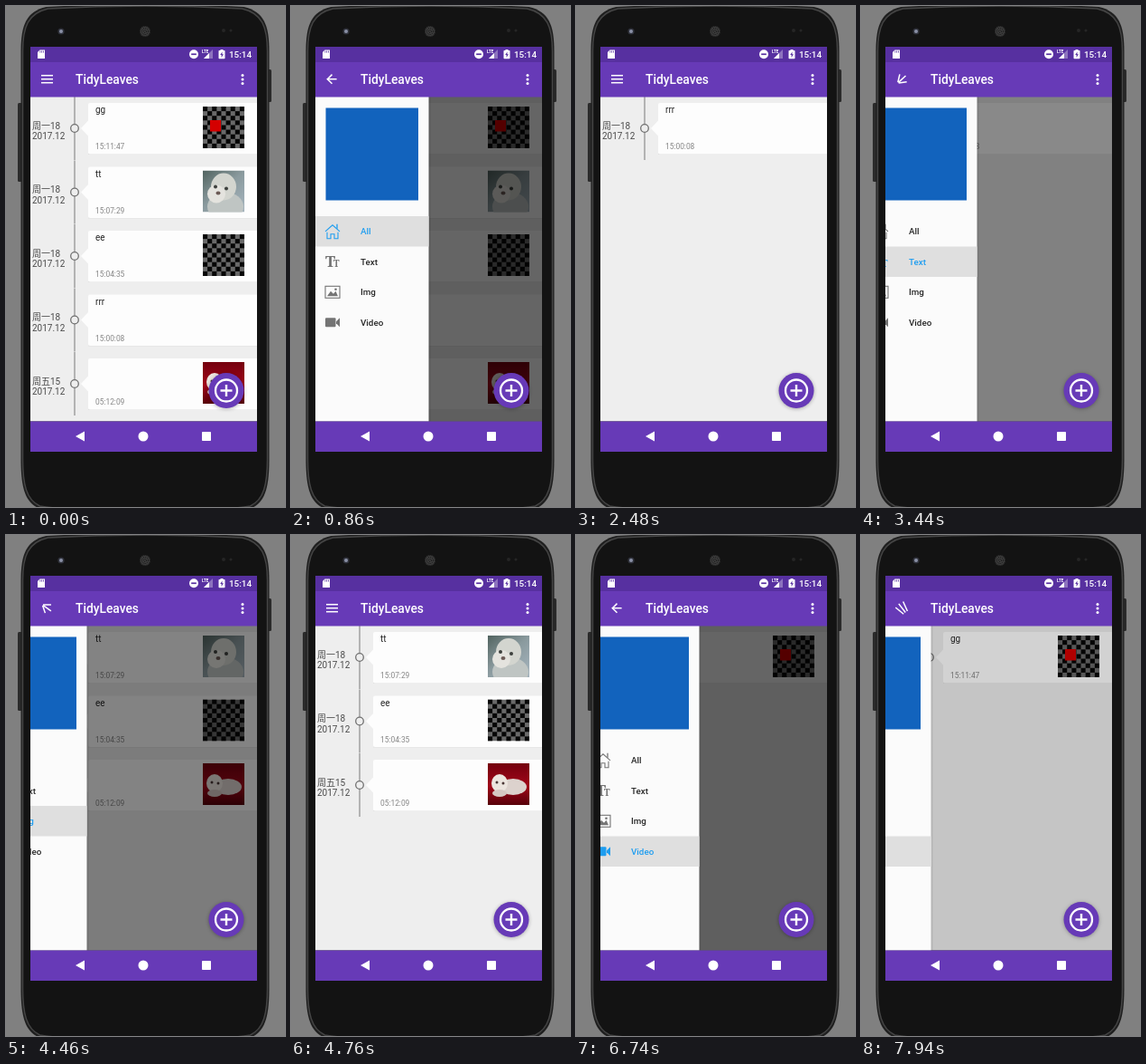
Recreate the animation shown at these times as an HTML page with a canvas. Size 309x553 px, loop 8000 ms.

```html
<!DOCTYPE html>
<html lang="en">
<head>
<meta charset="utf-8">
<title>Notes drawer</title>
<style>
html, body { margin: 0; width: 100%; height: 100%; overflow: hidden; background: #808080; }
canvas { display: block; width: 309px; height: 553px; }
</style>
</head>
<body>
<canvas id="stage"></canvas>
<script>
const W = 309, H = 553, LOOP = 8000, STEP = 60;
const SCREEN = { x: 27, y: 45, w: 251, h: 447 };
const TOP = 100, BOTTOM = 458.5, DRAWER = 125.5, ROW = 70.5;
const PURPLE = '#673ab7', BLUE = '#1e9df0', INK = '#262626';
const FONT = 'Roboto, "Noto Sans CJK SC", "Noto Sans CJK", sans-serif';

const canvas = document.getElementById('stage');
const c = canvas.getContext('2d');
const dpr = window.devicePixelRatio || 1;
canvas.width = W * dpr;
canvas.height = H * dpr;

const notes = [
  { text: 'gg', time: '15:11:47', day: '周一18', tab: 'Video', thumb: paintMarked },
  { text: 'tt', time: '15:07:29', day: '周一18', tab: 'Img', thumb: paintPale },
  { text: 'ee', time: '15:04:35', day: '周一18', tab: 'Img', thumb: paintChecks },
  { text: 'rrr', time: '15:00:08', day: '周一18', tab: 'Text' },
  { text: '', time: '05:12:09', day: '周五15', tab: 'Img', thumb: paintRed }
];

const tabs = [['All', homeIcon], ['Text', textIcon], ['Img', imageIcon], ['Video', videoIcon]];

// at: first visible change, from: start of the easing, end: settled
const moves = [
  { at: 0, from: -600, end: 0, open: false, tab: 'All' },
  { at: 500, from: 476, end: 860, open: true, tab: 'All' },
  { at: 2120, from: 2106, end: 2480, open: false, tab: 'Text' },
  { at: 3260, from: 3296, end: 3680, open: true, tab: 'Text' },
  { at: 4460, from: 4394, end: 4760, open: false, tab: 'Img' },
  { at: 5780, from: 5814, end: 6200, open: true, tab: 'Img' },
  { at: 6740, from: 6726, end: 7040, open: false, tab: 'Video' },
  { at: 7880, from: 7890, end: 8300, open: true, tab: 'Video' }
];

const lerp = (a, b, k) => a + (b - a) * k;

function openness(move, t, lag) {
  const k = Math.min(1, Math.max(0, (t - move.from - lag) / 512));
  const eased = t >= move.end ? 1 : 1 - Math.pow(1 - k, 5);
  return move.open ? eased : 1 - eased;
}

function rect(x, y, w, h, fill) {
  c.fillStyle = fill;
  c.fillRect(x, y, w, h);
}

function rounded(x, y, w, h, r, fill) {
  c.beginPath();
  c.roundRect(x, y, w, h, r);
  c.fillStyle = fill;
  c.fill();
}

function disc(x, y, r, fill) {
  oval(x, y, r, r, fill);
}

function oval(x, y, rx, ry, fill) {
  c.beginPath();
  c.ellipse(x, y, rx, ry, 0, 0, Math.PI * 2);
  c.fillStyle = fill;
  c.fill();
}

function ring(x, y, r, width, color) {
  c.beginPath();
  c.arc(x, y, r, 0, Math.PI * 2);
  c.lineWidth = width;
  c.strokeStyle = color;
  c.stroke();
}

function trace(points) {
  c.beginPath();
  points.forEach(([x, y], i) => i ? c.lineTo(x, y) : c.moveTo(x, y));
}

function shape(points, fill) {
  trace(points);
  c.closePath();
  c.fillStyle = fill;
  c.fill();
}

function line(points, width, color) {
  trace(points);
  c.lineWidth = width;
  c.strokeStyle = color;
  c.stroke();
}

function label(text, x, y, size, color, weight = 400, family = FONT) {
  c.font = `${weight} ${size}px ${family}`;
  c.fillStyle = color;
  c.fillText(text, x, y);
}

function clipped(x, y, w, h, paint) {
  c.save();
  c.beginPath();
  c.rect(x, y, w, h);
  c.clip();
  paint();
  c.restore();
}

// Thumbnails, each 46 by 46 from its own corner
function paintChecks() {
  const n = 9, s = 46 / n;
  rect(0, 0, 46, 46, '#696969');
  for (let i = 0; i < n * n; i += 2) rect(i % n * s, Math.floor(i / n) * s, s, s, '#060606');
}

function paintMarked() {
  paintChecks();
  rect(8, 15, 12, 12.5, '#d40000');
}

function paintPale() {
  const g = c.createLinearGradient(0, 0, 40, 46);
  g.addColorStop(0, '#51635f');
  g.addColorStop(0.5, '#8a9a9e');
  g.addColorStop(1, '#a3b2bb');
  rect(0, 0, 46, 46, g);
  oval(25, 40, 20, 16, '#bfc5c3');
  oval(23, 18, 14, 15, '#d3d5cf');
  oval(15, 26, 10, 10, '#e4e3de');
  disc(14, 18, 2, '#3d403d');
  disc(26, 20, 2, '#3d403d');
  oval(17, 25, 2.5, 2, '#6c5b56');
}

function paintRed() {
  const g = c.createLinearGradient(0, 0, 0, 46);
  g.addColorStop(0, '#74000e');
  g.addColorStop(0.55, '#a00619');
  g.addColorStop(1, '#570009');
  rect(0, 0, 46, 46, g);
  oval(28, 26, 15, 9, '#dcd2cd');
  oval(13, 22, 9, 10, '#ece5df');
  oval(13, 33, 8, 4, '#d5c7c2');
  disc(10, 21, 1.5, '#493635');
  disc(17, 22, 1.5, '#493635');
}

// Menu icons, drawn around their centre
function homeIcon(color) {
  line([[-8, 0], [0, -7], [8, 0]], 1.1, color);
  line([[-6, 1], [-6, 8], [-2, 8], [-2, 3], [2, 3], [2, 8], [6, 8], [6, 1]], 1.1, color);
  line([[5, -3], [5, -8]], 1.3, color);
}

function textIcon(color) {
  const serif = '"Noto Serif", serif';
  label('T', -8, 6, 17, color, 700, serif);
  label('T', 1, 6, 10, color, 700, serif);
}

function imageIcon(color) {
  c.lineWidth = 1.1;
  c.strokeStyle = color;
  c.strokeRect(-8, -6.5, 16, 13);
  shape([[-6, 4.5], [-2, -1], [1, 2], [3.5, -1], [6, 4.5]], color);
  disc(3.5, -3, 1.3, color);
}

function videoIcon(color) {
  rounded(-8, -5, 11.5, 10, 1, color);
  shape([[4, -1], [8, -5], [8, 5], [4, 1]], color);
}

// Body outline with bowed ends, shrunk by d on every side
function phonePath(d) {
  const l = 16.5 + d, r = 291.5 - d, mid = 154, t = 1 + d, b = 554 - d;
  c.beginPath();
  c.moveTo(l, 50);
  c.bezierCurveTo(l, t + 20, l + 6, t + 5, l + 28, t);
  c.quadraticCurveTo(mid, t - 6, r - 28, t);
  c.bezierCurveTo(r - 6, t + 5, r, t + 20, r, 50);
  c.lineTo(r, 500);
  c.bezierCurveTo(r, b - 24, r - 4, b - 7, r - 19, b);
  c.quadraticCurveTo(mid, b + 16, l + 19, b);
  c.bezierCurveTo(l + 4, b - 7, l, b - 24, l, 500);
  c.closePath();
}

function drawPhone() {
  rect(0, 0, W, H, '#808080');
  rounded(13, 107, 5, 87, 1.5, '#2b2b2b');
  rounded(290, 70, 4, 36, 1.5, '#2b2b2b');
  phonePath(0);
  c.fillStyle = '#1f1f1f';
  c.fill();
  phonePath(2);
  c.fillStyle = '#131313';
  c.fill();
  c.lineWidth = 1.5;
  c.strokeStyle = '#454545';
  c.stroke();

  disc(61, 28, 3.6, '#30323b');
  disc(61, 28, 2, '#8a90a6');
  disc(154, 28, 6, '#3c3c3c');
  for (let r = 1.5; r < 6; r += 2) {
    c.setLineDash([1, 1]);
    ring(154, 28, r, 0.9, '#0e0e0e');
  }
  c.setLineDash([]);
  disc(241, 27, 2, '#262626');
  disc(249, 27, 1.6, '#262626');
}

function drawNote(note, y) {
  const mid = y + 35;
  line([[76, y], [76, y + 70]], 1.2, '#8c8c8c');
  disc(76, mid, 4.4, '#eeeeee');
  ring(76, mid, 4.3, 1.3, '#707070');
  label(note.day, 29, y + 35.5, 10, '#4a4a4a');
  label('2017.12', 29, y + 47, 10, '#4a4a4a');
  rect(91, y + 63, 187, 1, '#e2e2e2');
  rounded(91, y + 7, 190, 56.5, 2, '#fdfdfd');
  shape([[91.5, mid - 9], [83, mid], [91.5, mid + 9]], '#fdfdfd');
  label(note.text, 99, y + 18, 10, INK);
  label(note.time, 99, y + 58, 8.4, '#858585');
  if (!note.thumb) return;
  c.save();
  c.translate(218, y + 11);
  clipped(0, 0, 46, 46, note.thumb);
  c.restore();
}

function drawDrawer(x, tab) {
  const edge = x + DRAWER;
  const g = c.createLinearGradient(edge, 0, edge + 3, 0);
  g.addColorStop(0, 'rgba(0,0,0,.12)');
  g.addColorStop(1, 'rgba(0,0,0,0)');
  rect(edge, TOP, 3, BOTTOM - TOP, g);
  rect(x, TOP, DRAWER, BOTTOM - TOP, '#fbfbfb');
  rect(x + 11.5, 112.5, 102.5, 102, '#1263bd');
  tabs.forEach(([name, icon], i) => {
    const mid = 248.8 + i * 33.5, active = name === tab;
    if (active) rect(x, mid - 16.8, DRAWER, 33.5, '#dfdfdf');
    c.save();
    c.translate(x + 19, mid);
    icon(active ? BLUE : '#747474');
    c.restore();
    label(name, x + 50, mid + 3.5, 9.8, active ? BLUE : INK, 500);
  });
}

function drawFab() {
  c.save();
  c.shadowColor = 'rgba(0,0,0,.3)';
  c.shadowBlur = 4 * dpr;
  c.shadowOffsetY = 0.8 * dpr;
  disc(244, 424.5, 19.5, PURPLE);
  c.restore();
  ring(244, 424.5, 12, 2.3, '#fff');
  line([[237.5, 424.5], [250.5, 424.5]], 2.4, '#fff');
  line([[244, 418], [244, 431]], 2.4, '#fff');
}

// Three bars that turn into a back arrow
function drawToggle(p, closing) {
  const bar = lerp(13, 7.9, p), shaft = lerp(13, 11.2, p);
  const angle = lerp(0, Math.PI / 4, p), cut = lerp(0, 0.5, p);
  const gap = lerp(4, -0.5, p);
  const dx = bar * Math.cos(angle), dy = bar * Math.sin(angle);
  c.save();
  c.translate(45.5, 80.7);
  c.rotate(Math.PI * (1 - p) * (closing ? 1 : -1));
  line([[-shaft / 2 + cut, 0], [shaft / 2 - cut, 0]], 1.5, '#fff');
  for (const s of [-1, 1]) {
    line([[-shaft / 2, s * gap], [-shaft / 2 + dx, s * (gap + dy)]], 1.5, '#fff');
  }
  c.restore();
}

function drawBars(p, closing) {
  rect(SCREEN.x, 45, SCREEN.w, 17, '#5730a0');
  rect(SCREEN.x, 62, SCREEN.w, 38.5, PURPLE);
  rect(SCREEN.x, BOTTOM, SCREEN.w, 34, PURPLE);

  shape([[37.5, 48.5], [43, 48.5], [43, 58], [35, 58], [35, 51]], '#fff');
  for (const x of [37.5, 39.3, 41]) rect(x, 49.5, 0.8, 2, '#5730a0');
  disc(208, 53.2, 5, '#fff');
  rect(205.2, 52.4, 5.6, 1.7, '#5730a0');
  shape([[229, 48], [229, 58], [219, 58]], '#8d74be');
  shape([[225, 52], [225, 58], [219, 58]], '#fff');
  label('LTE', 217, 52, 4.5, '#fff', 700);
  rect(237.5, 48, 3, 1.5, '#fff');
  rounded(235.5, 49, 7, 9.3, 0.8, '#fff');
  shape([[239.5, 50.5], [237.2, 54], [238.7, 54], [238.5, 57], [240.9, 53.2], [239.4, 53.2]], '#5730a0');
  label('15:14', 247, 57, 9.9, '#fff', 500);

  drawToggle(p, closing);
  label('TidyLeaves', 77, 86, 13.8, '#fff', 500);
  for (const y of [76.6, 81, 85.4]) disc(262, y, 1.5, '#fff');

  shape([[77, 475], [87, 469.5], [87, 480.5]], '#fff');
  disc(152, 475, 5.5, '#fff');
  rounded(217, 470, 10, 10, 0.8, '#fff');
}

function draw(t) {
  // The picture advances in steps of 60 ms
  const q = Math.max(0, Math.floor((t - 20) / STEP) * STEP + 20);
  const move = moves.filter(m => m.at <= q).pop();
  const p = openness(move, q, 0);
  const late = openness(move, q, move.open ? 16 : 44);

  c.setTransform(dpr, 0, 0, dpr, 0, 0);
  drawPhone();
  clipped(SCREEN.x, SCREEN.y, SCREEN.w, SCREEN.h, () => {
    rect(SCREEN.x, TOP, SCREEN.w, BOTTOM - TOP, '#eeeeee');
    notes.filter(n => move.tab === 'All' || n.tab === move.tab)
      .forEach((n, i) => drawNote(n, TOP + i * ROW));
    rect(SCREEN.x, TOP, SCREEN.w, BOTTOM - TOP, `rgba(0,0,0,${0.6 * late})`);
    if (p > 0) drawDrawer(SCREEN.x + Math.round((p - 1) * DRAWER), move.tab);
    drawFab();
    drawBars(late, !move.open && q < move.end);
  });
}

function tick() {
  draw(performance.now() % LOOP);
  requestAnimationFrame(tick);
}
tick();
</script>
</body>
</html>
```
